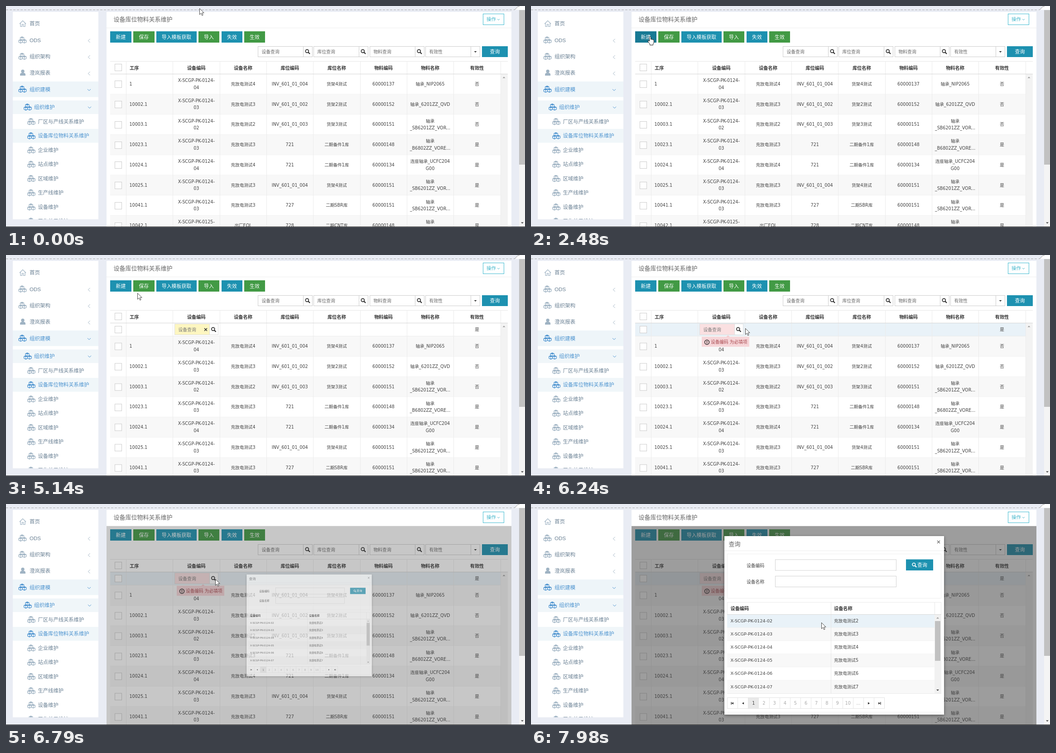
Write an HTML page that moves like this. It is 1146 px wide and 489 px high and loops after 8 s.

```html
<!DOCTYPE html>
<html lang="zh-CN">
<head>
<meta charset="utf-8">
<title>设备库位物料关系维护</title>
<style>
html, body { margin: 0; width: 100%; height: 100%; overflow: hidden; background: #e9ecf4; }
svg { display: block; }
text { font-family: "DejaVu Sans", "Noto Sans CJK SC", "Noto Sans CJK", sans-serif; white-space: pre; }
.side text, .head { font-family: "Liberation Sans", "Noto Sans CJK SC", "Noto Sans CJK", sans-serif; font-weight: 300; }
</style>
</head>
<body>
<svg id="stage" width="1146" height="489" viewBox="0 0 1146 489"></svg>
<script>
const TEAL = '#1d91b0', GREEN = '#429a45', LINE = '#e6e6e6', INK = '#444';
const COLS = [230, 265, 368.5, 472, 575, 678.5, 782, 885, 988, 1092];
const LOOP = 8000, STEP = 70, ROW = 44.75, NEW_ROW = 29.3;

// Drawing helpers: every text is given by its vertical centre.
const rect = (x, y, w, h, fill, more = '') =>
  `<rect x="${x}" y="${y}" width="${w}" height="${h}" fill="${fill}" ${more}/>`;
const box = (x, y, w, h, fill, stroke = '#ccc') =>
  rect(x + .5, y + .5, w - 1, h - 1, fill, `stroke="${stroke}"`);
const path = (d, fill = 'none', stroke = 'none', width = 1, more = '') =>
  `<path d="${d}" fill="${fill}" stroke="${stroke}" stroke-width="${width}" ${more}/>`;
const text = (x, y, s, size = 9.6, fill = INK, anchor = 'start', more = '') =>
  `<text x="${x}" y="${y + size * .37}" font-size="${size}" fill="${fill}" text-anchor="${anchor}" ${more}>${s}</text>`;
const mid = (x, y, s, size, fill, more) => text(x, y, s, size, fill, 'middle', more);
const bold = 'font-weight="700"';
const group = (id, body, more = '') => `<g id="${id}" ${more}>${body}</g>`;
const lens = (x, y, color = '#333', k = 1) =>
  `<g transform="translate(${x} ${y}) scale(${k})" fill="none" stroke="${color}">
    <circle cx="-1.2" cy="-1.2" r="3.5" stroke-width="1.7"/><path d="M1.5 1.5L5 5" stroke-width="2.3"/></g>`;
const chevron = (x, y, down, color, r = 3.5) =>
  path(down ? `M${x - r} ${y - r / 2}l${r} ${r} ${r} ${-r}` : `M${x + 2} ${y - 4}l-4 4 4 4`, 'none', color);
const tri = (x, y, dir, color = '#333', r = 3) => path({
  up: `M${x - r} ${y + r / 2}h${2 * r}l${-r} ${-r}z`, down: `M${x - r} ${y - r / 2}h${2 * r}l${-r} ${r}z`,
  left: `M${x + r * .8} ${y - r}v${2 * r}l${-r * 1.7} ${-r}z`, right: `M${x - r * .8} ${y - r}v${2 * r}l${r * 1.7} ${-r}z`
}[dir], color);

const cube = (x, y) => path(`M${x} ${y - 4}l4 1.8v4.2l-4 2-4-2v-4.2z`, '#fff', 'currentColor', 1.3) +
  path(`M${x - 4} ${y - 2.2}l4-1.8 4 1.8-4 1.8z`, 'currentColor') + path(`M${x} ${y}v4`, 'none', 'currentColor', 1.3);
const cubes = (x, y, color) =>
  `<g transform="translate(${x} ${y})" style="color:${color}">${cube(-1, -3)}${cube(-4.2, 3.2)}${cube(4.2, 3)}</g>`;

function sidebar() {
  const grey = '#6a8094', pale = '#9fb3c3', blue = '#4c93cf';
  let s = rect(15, 13, 189, 459, '#fff') + rect(15, 167, 189, 34.5, '#eef5f9') +
    rect(15, 209, 189, 30, '#f0f6f9') + rect(15, 272, 189, 30.5, '#f0f6f9');
  s += path('M30 39.5l7-7 7 7M32 38.5v7h3.5v-5h3v5h3.5v-7', 'none', pale, 1.2) + text(52, 39, '首页', 11.5, grey);
  ['ODS', '组织架构', '澄岚报表', '组织建模'].forEach((label, i) => {
    const y = 75.5 + i * 36.3, on = i === 3;
    s += i === 2 ? `<circle cx="37" cy="144.5" r="3.7" fill="${pale}"/>` + path('M31 154v-2q0-4 4-4h4q4 0 4 4v2z', pale)
      : cubes(36.5, y - .5, on ? blue : pale);
    s += text(52, y, label, 11.5, on ? blue : grey) + chevron(183.5, y + 1.3, on, on ? blue : pale);
  });
  s += cubes(48, 223.5, blue) + text(62, 224, '组织维护', 11.4, blue) + chevron(184.5, 224.5, true, blue);
  ['厂区与产线关系维护', '设备库位物料关系维护', '企业维护', '站点维护', '区域维护', '生产线维护', '设备维护', '工作单元维护']
    .forEach((label, i) => {
      const y = 255.5 + i * 31.5, on = i === 1;
      s += cubes(56, y, on ? blue : pale) + text(70.5, y, label, 11.3, on ? blue : grey);
    });
  return `<g class="side" clip-path="url(#sideClip)">${s}</g>`;
}

function buttons() {
  const items = [['新建', 230, 47], ['保存', 281, 47], ['导入模板获取', 332, 89], ['导入', 425, 46], ['失效', 476, 46], ['生效', 526, 46]];
  return items.map(([label, x, w], i) =>
    rect(x, 56, w, 25, i % 2 ? GREEN : TEAL, `id="btn${i}"`) + mid(x + w / 2, 68.5, label, 10.9, '#fff')).join('') +
    rect(1051, 89, 57, 24, TEAL) + mid(1079.5, 100.5, '查询', 10.9, '#fff');
}

function filters() {
  return ['设备查询', '库位查询', '物料查询', '有效性'].map((label, i) => {
    const x = Math.round(556 + i * 123.3);
    return box(x, 89, 121, 24, '#fff') + rect(x + 100, 89, 1, 24, '#ccc') + text(x + 8.5, 101, label, 9.8, '#666') +
      (i < 3 ? lens(x + 110, 101) : tri(x + 110.5, 101.5, 'down'));
  }).join('');
}

const DEVICE = 'X-SCGP-PK-012';
const ROWS = [
  ['1', '4-/04', '充放电测试4', 'INV_601_01_004', '货架4测试', '137', '轴承_NIP2065', '否'],
  ['10002.1', '4-/03', '充放电测试3', 'INV_601_01_002', '货架2测试', '152', '轴承_6201ZZ_QVD', '否'],
  ['10003.1', '4-/02', '充放电测试2', 'INV_601_01_003', '货架3测试', '151', '轴承/_SB6201ZZ_VOR...', '否'],
  ['10023.1', '4-/03', '充放电测试3', '721', '二期备件1库', '148', '轴承/_B6802ZZ_VORE...', '是'],
  ['10024.1', '4-/04', '充放电测试4', '721', '二期备件1库', '134', '连座轴承_UCFC204/G00', '是'],
  ['10025.1', '4-/03', '充放电测试3', 'INV_601_01_004', '货架4测试', '151', '轴承/_SB6201ZZ_VOR...', '是'],
  ['10041.1', '4-/03', '充放电测试3', '727', '二期SBR库', '151', '轴承/_SB6201ZZ_VOR...', '是'],
  ['10042.1', '5-/03', '出厂EOL', '728', '二期CNT库', '148', '轴承/_SB6201ZZ_VOR...', '是']
];
const centre = i => (COLS[i] + COLS[i + 1]) / 2;
const check = y => box(240, Math.round(y - 7.5), 16, 16, '#fff', '#ccc');
const columnLines = (y, h) => COLS.slice(1).map(x => rect(Math.floor(x), y, 1, h, '#ebebeb')).join('');

function dataRows() {
  return ROWS.map((row, r) => {
    const top = 150.5 + r * ROW, y = top + 21.8;
    let s = rect(230, top, 862, ROW, '#fff', 'class="band"') +
      rect(230, top + ROW - .5, 862, 1, '#ebebeb') + check(y + .5) + text(272.5, y, row[0]);
    row.slice(1).forEach((cell, c) => {
      const lines = ((c === 0 ? DEVICE : c === 4 ? '60000' : '') + cell).split('/');
      lines.forEach((line, k) => s += mid(centre(c + 2), y + (lines.length > 1 ? k * 15.5 - 7.7 : 0), line));
    });
    return s;
  }).join('') + columnLines(150, 345);
}

function newRow() {
  return rect(230, 150.5, 862, 29, '#fff', 'id="newBand"') + rect(230, 179, 862, 1, '#ebebeb') +
    columnLines(150, 29) + check(164.5) + mid(1040, 164.5, '是') +
    box(372, 152, 97, 25, '#fff', '#ddd') + rect(373, 153, 76, 23, '#fdf6c0', 'id="field"') +
    rect(449, 153, 1, 23, '#ddd') + text(380.5, 165, '设备查询', 9.8, '#777') +
    group('clear', path('M438 162l6 6m0-6l-6 6', 'none', '#333', 1.6)) + lens(458.5, 165);
}

function warning() {
  return path('M431 181.5l4-4 4 4z', '#f2c9cc') + rect(377, 181, 105, 22, '#f6d5d8') +
    '<circle cx="388.5" cy="193" r="5" fill="none" stroke="#333" stroke-width="1.5"/>' +
    rect(387.7, 190, 1.6, 3.8, '#333') + rect(387.7, 194.6, 1.6, 1.6, '#333') +
    text(397, 192.5, '设备编码 为必填项', 9.7, '#a94a50');
}

function table() {
  const names = ['工序', '设备编码', '设备名称', '库位编码', '库位名称', '物料编码', '物料名称', '有效性'];
  let s = box(230, 122, 878, 380, '#fff', LINE) + rect(1092, 150, 16, 340, '#f3f3f3') + tri(1099.5, 158, 'up', '#999');
  s += group('rows', dataRows()) + group('fresh', newRow());
  s += rect(230, 122, 878, 28, '#fff') + rect(230, 122, 878, 1, LINE) + rect(230, 150, 878, 1, '#d5d5d5') +
    columnLines(122, 28) + check(135.5);
  names.forEach((n, i) => s += i ? mid(centre(i + 1), 137.5, n, 10.2, '#333', bold) : text(273, 137.5, n, 10.2, '#333', 'start', bold));
  return s + group('warning', warning());
}

function dialog() {
  let s = rect(427, 71, 485, 395, '#fff', 'filter="url(#shadow)"') + text(436.5, 88, '查询', 13, '#666', 'start', 'class="head"') +
    path('M897 81l6 6m0-6l-6 6', 'none', '#777', 1.5) + rect(427, 103, 485, 1, '#eee') + box(433, 110, 473, 99, '#fff', '#eee');
  ['设备编码', '设备名称'].forEach((label, i) =>
    s += text(476, 136 + i * 36.5, label, 9.8) + box(539, 122.5 + i * 36.5, 268, 25, '#fff', '#d2d2d2'));
  s += rect(828, 122.5, 60, 24.5, TEAL) + lens(846.5, 135, '#fff', .95) + text(853, 134.5, '查询', 10.9, '#fff');
  s += box(433, 217, 473, 203, '#fff', '#eaeaea');
  for (let i = 0; i < 6; i++) {
    const y = 244.5 + i * 29.15;
    s += rect(433, y, 458, 29.15, i % 2 ? '#f8f8f8' : '#fff', `id="pick${i}"`) + rect(433, y + 28.6, 458, 1, '#ececec') +
      text(440.5, y + 13.8, `${DEVICE}4-0${i + 2}`, 9.5) + text(669, y + 13.8, '充放电测试' + (i + 2));
  }
  s += rect(662, 217, 1, 202, LINE) + rect(891, 217, 1, 27, LINE) + rect(433, 244, 473, 1, '#d8d8d8') +
    text(440.5, 231, '设备编码', 10.2, '#333', 'start', bold) + text(669, 231, '设备名称', 10.2, '#333', 'start', bold) +
    rect(891, 245, 15, 174, '#f1f1f1') + rect(892, 259, 12, 88, '#c1c1c1') + tri(898, 252, 'up', '#999') + tri(898, 412, 'down');
  s += box(433, 428, 348, 25, '#fff', '#e2e2e2') + rect(480, 429, 23, 23, '#e9e9e9');
  for (let i = 0; i < 15; i++) {
    const x = 445 + i * 23.15;
    if (i) s += rect(Math.round(x - 12), 429, 1, 23, '#e6e6e6');
    if (i < 2 || i > 12) {
      s += tri(x, 441, i < 2 ? 'left' : 'right', '#333', 2.5);
      if (i % 14 === 0) s += rect(x + (i ? 2.2 : -3.4), 438, 1.3, 6, '#333');
    } else s += mid(x, 440.5, i < 12 ? i - 1 : '...', 9.8, i === 2 ? '#444' : '#aaa');
  }
  return s + rect(433, 460, 473, 1, '#eee');
}

const ARROW = path('M.5 .5v13.5l3.2-3 2.2 5 2.2-1-2.2-4.8h4.3z', '#fff', '#333', .9);
const HAND = path('M-1.5 11V1.5Q0-.5 1.5 1.5V7Q3 5.5 4 7.3 5.5 6 6.3 8 8 7 8.3 9v5L6.5 17v2.5H-.5V17L-4.5 12Q-5.5 9-3.5 9z', '#fff', '#222');

document.getElementById('stage').innerHTML = `<defs>
  <clipPath id="sideClip"><path d="M15 13h189v459H15z"/></clipPath>
  <filter id="shadow" x="-10%" y="-10%" width="120%" height="120%">
    <feDropShadow dx="0" dy="2" stdDeviation="3.5" flood-opacity=".4"/></filter></defs>` +
  rect(0, 0, 1146, 489, '#e9ecf4') + path('M0 8.5H1120', 'none', '#aaa', 1, 'stroke-dasharray="5 3"') +
  sidebar() + rect(222, 13, 894, 476, '#fff') +
  text(237.5, 29, '设备库位物料关系维护', 13, '#666', 'start', 'class="head"') + rect(222, 48, 894, 1, '#eee') +
  box(1053, 17, 47, 25, '#fff', '#3fbad0') + text(1061, 29.5, '操作', 10.5, '#3fb5ca') + chevron(1087.5, 30, true, '#3fb5ca', 2.5) +
  buttons() + filters() + table() + rect(222, 49, 894, 439, '#3c3c3c', 'id="veil"') + group('dialog', dialog()) +
  rect(1133, 9, 13, 479, '#f4f4f4') + rect(1133, 9, 13, 342, '#c1c1c1', 'id="thumb"') + tri(1140, 480, 'down', '#444') +
  path('M1121 8.5q4 0 6-4t7-4h12v8z', '#fff') + path('M1121 8.5q4 0 6-4t7-4', 'none', '#999') +
  rect(0, 488, 1146, 1, '#222') + group('cursor', group('arrow', ARROW) + group('hand', HAND));

// Bursts of movement; inside each one the picture advances every STEP ms.
const BURSTS = [[70, 140], [600, 1370], [1440, 2210], [2410, 2480], [3210, 3560], [4030, 4520], [4720, 5490],
  [5560, 5700], [5830, 5970], [6170, 6450], [6580, 6930], [7000, 7770], [7840, 7980]];
const TRAIL = [[0, 427, 5], [140, 433, 0], [600, 437, 0], [740, 447, 1], [1020, 400, 45], [1300, 302, 82], [1370, 310, 76],
  [1580, 292, 74], [1860, 270, 72], [2210, 261, 67], [2410, 262, 67], [2480, 263, 67], [3210, 263, 67], [3560, 270, 68],
  [4030, 274, 69], [4240, 330, 155], [4310, 342, 160], [4520, 365, 125], [4720, 362, 122], [5140, 290, 84], [5490, 264, 73],
  [5560, 272, 72], [5700, 298, 71], [5970, 301, 71], [6170, 380, 116], [6240, 473, 162], [6450, 466, 165],
  [6580, 462, 166], [7000, 462, 166], [7350, 520, 205], [7770, 605, 247], [7980, 641, 262]];

function settle(t) {
  const burst = BURSTS.filter(b => b[0] <= t).pop();
  return burst ? Math.min(burst[1], burst[0] + Math.floor((t - burst[0]) / STEP) * STEP) : 0;
}
function pointer(t) {
  const i = TRAIL.findIndex(p => p[0] > t);
  if (i < 0) return TRAIL[TRAIL.length - 1].slice(1);
  const [a, b] = [TRAIL[i - 1], TRAIL[i]], k = (t - a[0]) / (b[0] - a[0]);
  return [a[1] + (b[1] - a[1]) * k, a[2] + (b[2] - a[2]) * k];
}

const el = id => document.getElementById(id);
const show = (id, on) => el(id).setAttribute('display', on ? 'inline' : 'none');
const set = (id, name, value) => el(id).setAttribute(name, value);
const bands = document.querySelectorAll('.band');

function draw(now) {
  const t = settle(now % LOOP), [x, y] = pointer(t);
  const added = t >= 3350, invalid = t >= 5830;
  const onBar = y > 56 && y < 81 && x > 230 && x < 572;
  const grow = Math.sin(Math.min(1, Math.max(0, (t - 6675) / 298)) * Math.PI / 2);

  set('rows', 'transform', `translate(0 ${added ? NEW_ROW : 0})`);
  bands.forEach((b, i) => b.setAttribute('fill', (i + added) % 2 ? '#f8f8f8' : '#fff'));
  show('fresh', added);
  show('clear', !invalid);
  show('warning', invalid);
  set('field', 'fill', invalid ? '#fae0e1' : '#fdf6c0');
  set('newBand', 'fill', (y > 150 && y < 179) || t > 6600 ? '#e9f2f8' : '#fff');
  set('btn0', 'fill', onBar && x < 277 ? '#187a94' : TEAL);
  set('thumb', 'height', added ? 327 : 342);

  show('dialog', grow > 0);
  set('dialog', 'transform', `translate(669.5 268.5) scale(${grow}) translate(-669.5 -268.5)`);
  set('dialog', 'opacity', Math.min(1, grow * 1.08));
  set('veil', 'opacity', grow * .5);
  set('pick0', 'fill', t >= 7700 ? '#e9f2f8' : '#fff');

  show('hand', onBar);
  show('arrow', !onBar);
  set('cursor', 'transform', `translate(${Math.round(x)} ${Math.round(y)})`);
}

const start = performance.now();
function tick() {
  draw(performance.now() - start);
  requestAnimationFrame(tick);
}
tick();
</script>
</body>
</html>
```
